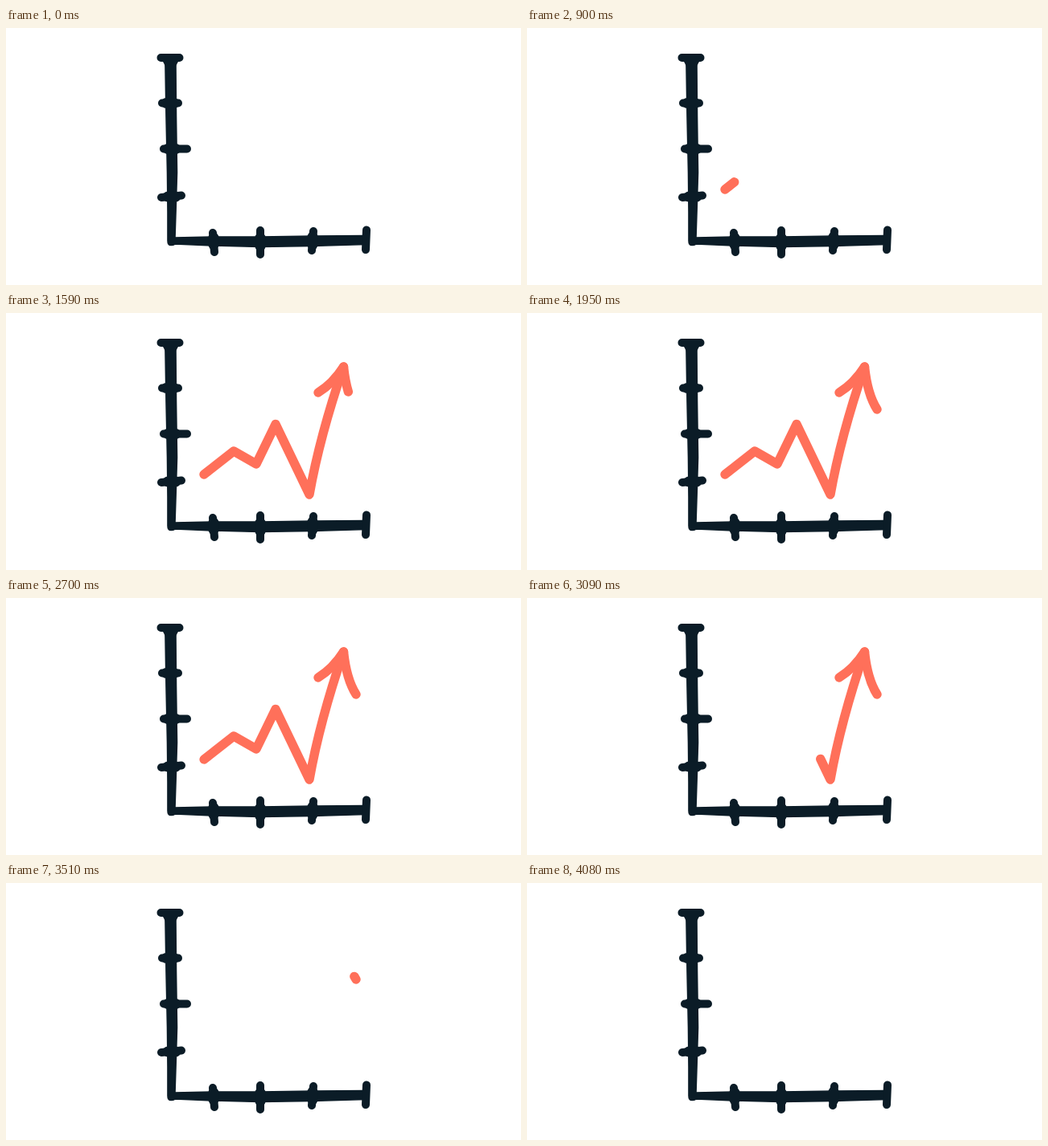
An HTML page that plays this animation: 640 px wide and 320 px high, repeating every 4500 ms.

```html
<!DOCTYPE html>
<html lang="en">
<head>
<meta charset="utf-8">
<title>Growth chart</title>
<style>
  html, body { margin: 0; width: 100%; height: 100%; overflow: hidden; background: #fff; }
  svg { display: block; width: 100vw; height: 100vh; }
  path { fill: none; stroke: #0b1c27; stroke-linecap: round; stroke-linejoin: round; }
  .axis { fill: #0b1c27; stroke-width: 1.6; }
  .ticks { stroke-width: 10; }
  .knots { stroke-width: 13; }
  .trend { stroke: #ff705a; stroke-width: 11.4; }
</style>
</head>
<body>
<svg viewBox="0 0 640 320">
  <path class="axis" d="M193 39 Q198 43 198 48 L199 110 L200.500 180 L201 230 L201 265
    Q201 270.500 205 270.500 Q208 270.500 210 269 L258 271 L316 272.500 L380 271.500 L447 269.500 L447 258.500
    L382 259 L316 260 L258 260 L210 261 L211 230 L212.500 180 L211.500 110 L211 48 Q211 43 216 39 Z"/>
  <path class="ticks" d="M192.500 37 H215.500 M194 93.500 H214 M196 150.500 H225 M193 211 L218 208.500
    M257 255 L259 279 M316 252 V282 M382 253 L380 277 M448 251.500 L447 276"/>
  <path class="knots" d="M199 93.500 H209 M201 150.500 H211 M201 210 H211
    M258 261 V270 M316 261 V272 M381 260 V270"/>
  <path class="trend" d="M246 201 L283 172 L311 188 L335 138.500 L377 226 Q390 153 419.500 67"/>
  <path class="trend" d="M388 99 Q406 88 419.500 67 Q423 101 435 120"/>
</svg>
<script>
const LOOP = 4500;
const strokes = [...document.querySelectorAll('.trend')];
const lengths = strokes.map(s => s.getTotalLength());
const total = lengths[0] + lengths[1];

// Bezier easing (x1, 0, x2, 1), solved for x by bisection.
function ease(x, x1, x2) {
  if (x <= 0) return 0;
  if (x >= 1) return 1;
  let lo = 0, hi = 1, s;
  for (let i = 0; i < 24; i++) {
    s = (lo + hi) / 2;
    const q = 1 - s;
    if (3 * q * q * s * x1 + 3 * q * s * s * x2 + s ** 3 < x) lo = s;
    else hi = s;
  }
  return s * s * (3 - 2 * s);
}

// Shows only the part of the trend between two distances along it.
function trim(from, to) {
  let offset = 0;
  strokes.forEach((stroke, i) => {
    const a = Math.max(from - offset, 0);
    const b = Math.min(to - offset, lengths[i]);
    stroke.style.display = b > a ? '' : 'none';
    stroke.style.strokeDasharray = `${Math.max(b - a, 0)} 2000`;
    stroke.style.strokeDashoffset = -a;
    offset += lengths[i];
  });
}

function frame() {
  const t = performance.now() % LOOP;
  const head = ease((t - 700) / 1150, 0.66, 0.31);
  const tail = ease((t - 2685) / 935, 0.66, 0.235);
  trim(tail * total, head * total);
  requestAnimationFrame(frame);
}
frame();
</script>
</body>
</html>
```
